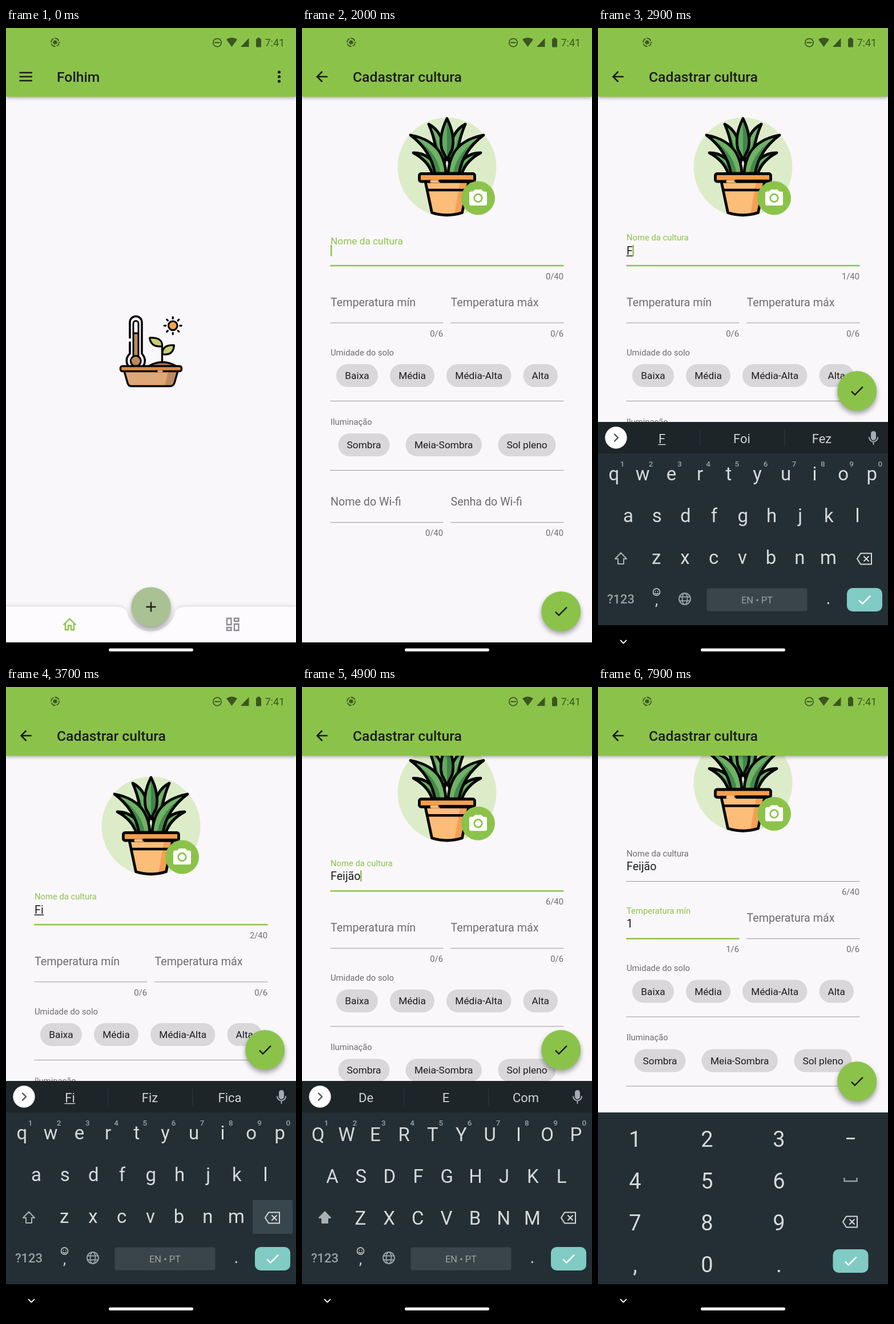
These frames come from a looping animation (508x1102 px, 8000 ms). An HTML page with a canvas:

```html
<!DOCTYPE html>
<html lang="pt">
<head>
<meta charset="utf-8">
<title>Cadastrar cultura</title>
<style>
html, body { margin: 0; width: 100%; height: 100%; overflow: hidden; background: #000; }
canvas { display: block; width: 508px; height: 1102px; }
</style>
</head>
<body>
<canvas id="stage"></canvas>
<script>
const W = 508, H = 1102, LOOP = 8000;
const GREEN = '#8bc34a', PAGE = '#f9f7fa', INK = '#1b1b1d', GREY = '#6e6c70', KEY = '#d5dadc', DIM = '#98a1a5';
const canvas = document.getElementById('stage');
const ctx = canvas.getContext('2d');
const ratio = window.devicePixelRatio || 1;
canvas.width = W * ratio;
canvas.height = H * ratio;

// Timeline in ms
const OPEN = 100, FOCUS_NAME = 1960, KEYS_UP = 2040, SCROLL = 4700, FOCUS_TEMP = 5300, CARET_TEMP = 5420, TYPE_ONE = 6950;
const edits = [
  [FOCUS_NAME, '', null],
  [2900, 'F', ['F', 'Foi', 'Fez']],
  [3150, 'Fi', ['Fi', 'Fiz', 'Fica']],
  [3780, 'F', ['F', 'Foi', 'Fez']],
  [3980, 'Fe', ['Fe', 'Fez', 'Feito']],
  [4150, 'Fei', ['Fei', 'Feito', 'Feira']],
  [4300, 'Feij', ['Feij', 'Feijão', 'Feijões']],
  [4500, 'Feijão', ['De', 'E', 'Com']]
];

const ramp = (t, start, length) => Math.min(1, Math.max(0, (t - start) / length));
const easeOut = (u, power = 3) => 1 - (1 - u) ** power;
const mix = (a, b, u) => a + (b - a) * u;

// y is the middle of the capital letters
function text(s, x, y, size, color = INK, align = 'left', weight = 400) {
  ctx.font = `${weight} ${size}px Roboto, sans-serif`;
  ctx.textAlign = align;
  ctx.fillStyle = color;
  ctx.fillText(s, x, y + size * 0.356);
  return ctx.measureText(s).width;
}
function shape(path, fill, stroke, width = 2) {
  if (typeof path === 'string') path = new Path2D(path);
  if (fill) { ctx.fillStyle = fill; ctx.fill(path); }
  if (stroke) { ctx.strokeStyle = stroke; ctx.lineWidth = width; ctx.stroke(path); }
}
function box(x, y, w, h, r, fill, stroke, width) {
  const p = new Path2D();
  p.roundRect(x, y, w, h, r);
  shape(p, fill, stroke, width);
}
function disc(x, y, r, fill, stroke, width) {
  const p = new Path2D();
  p.arc(x, y, r, 0, 7);
  shape(p, fill, stroke, width);
}
function rays(x, y, inner, outer, color, width) {
  for (let i = 0; i < 8; i++) {
    const c = Math.cos(i * Math.PI / 4), s = Math.sin(i * Math.PI / 4);
    shape(`M${x + c * inner} ${y + s * inner}L${x + c * outer} ${y + s * outer}`, null, color, width);
  }
}
function group(draw, dx = 0, dy = 0) {
  ctx.save();
  ctx.translate(dx, dy);
  draw();
  ctx.restore();
}
function sharp(draw) {
  ctx.save();
  ctx.lineCap = 'butt';
  ctx.lineJoin = 'miter';
  draw();
  ctx.restore();
}
function shadow(blur, dy, alpha, draw) {
  ctx.save();
  ctx.shadowColor = `rgba(0,0,0,${alpha})`;
  ctx.shadowBlur = blur * ratio;
  ctx.shadowOffsetY = dy * ratio;
  draw();
  ctx.restore();
}
function check(x, y, color) {
  sharp(() => shape(`M${x - 9.8} ${y + 0.9}L${x - 3.7} ${y + 6.9}L${x + 10.2} ${y - 7}`, null, color, 2.5));
}

function appBar(title) {
  shadow(6, 2, 0.35, () => box(0, -4, W, 124, 0, GREEN));
  text(title, 89, 85.5, 24.7, INK, 'left', 500);
}
function statusBar() {
  const c = '#3c5522';
  disc(86, 25, 3.6, c);
  ctx.setLineDash([7.5, 3.5]);
  disc(86, 25, 7, null, c, 1.8);
  ctx.setLineDash([]);
  disc(370, 25.5, 7.2, null, c, 1.7);
  shape('M366 25.5H374', null, c, 1.8);
  shape('M386 20Q395.500 13.500 405 20L395.500 33Z', c);
  shape('M411 33L425.500 17.500V33Z', c);
  box(438, 18.5, 9, 15, 1.5, c);
  box(440.5, 16.8, 4, 3, 0, c);
  text('7:41', 453.5, 26, 18, c);
}
function navBar(withChevron) {
  box(0, 1073, W, 29, 0, '#000');
  box(180, 1083.5, 148, 5.2, 2.6, '#f2f2f2');
  if (withChevron) shape('M39.500 1069.500L44.500 1074.500L49.500 1069.500', null, '#eee', 2);
}
function fab(x, y, color) {
  shadow(9, 5, 0.36, () => disc(x, y, 34.6, color));
}

function seedTray() {
  const k = '#050508';
  disc(227.3, 581, 16, '#fdfbfe', k, 3.6);
  shape('M217 572V514a10.500 10.500 0 0 1 21 0V572', '#fdfbfe');
  shape('M217 541V514a10.500 10.500 0 0 1 21 0V569M217 549V569', null, k, 3.6);
  shape('M223 533H232V573H223Z', '#bd8a5c');
  disc(227.3, 581.5, 9, '#bd8a5c', k, 3);
  shape('M223 573V516a4.500 4.500 0 0 1 9 0V573M223 533H232', null, k, 3);
  shape('M249 591Q274 576 299 591Z', '#a8754c', k, 3.4);
  shape('M273.500 584V556', null, k, 3.4);
  shape('M273.500 556Q275 540 251.500 541Q254 558 273.500 556Z', '#c6cf6c', k, 3.2);
  shape('M274 569.500Q273 553 294.500 554Q293 573 274 569.500Z', '#c6cf6c', k, 3.2);
  disc(292.3, 519.8, 7.8, '#f2a648', k, 3.2);
  rays(292.3, 519.8, 12.5, 15, k, 3.2);
  shape('M207 599L213 620Q214.500 625.500 220 625.500H288Q293 625.500 295 620L301 599Z', '#dfa677');
  shape('M284 600H300L294 620Q292 624 288 624H278Z', '#c18a5e');
  shape('M207 599L213 620Q214.500 625.500 220 625.500H288Q293 625.500 295 620L301 599', null, k, 3.4);
  box(200.5, 590.5, 107, 9, 3.5, '#dd8a42', k, 3.4);
  shape('M267 599.500H273', null, '#dfa677', 3.6);
}
function home() {
  box(0, 0, W, H, 0, PAGE);
  appBar('Folhim');
  sharp(() => shape('M23.500 78H46M23.500 85H46M23.500 92H46', null, INK, 2.5));
  for (const y of [77, 85, 93]) disc(478.5, y, 2.6, INK);
  seedTray();
  shadow(6, -1, 0.14, () => shape('M0 1010.500H190Q208 1010.500 212 1020A43 43 0 0 0 296 1020Q300 1010.500 318 1010.500H508V1080H0Z', '#fdfbfe'));
  sharp(() => {
    shape('M100.500 1042.500L111.500 1032L122.500 1042.500M104 1040V1051H109V1043.500H114V1051H119V1040', null, GREEN, 2.4);
    for (const [x, y, h] of [[387, 1031, 11], [387, 1047, 5], [400, 1031, 5], [400, 1041, 11]]) box(x, y, 7.5, h, 0, null, '#8b898d', 2.3);
  });
}

// Left half of the foliage, back to front: outline, shaded part
const leaves = [
  ['M222 168Q247 180 252 224L246 254H238Q238 204 222 168Z', 'M222 168Q244 205 246 254H238Q238 204 222 168Z'],
  ['M195 218Q227 218 241 254H228Q220 231 195 218Z', 'M195 218Q224 229 235 254H228Q220 231 195 218Z'],
  ['M190 187Q227 194 242 218Q251 234 252 254H233Q226 214 190 187Z', 'M190 187Q237 214 243 254H233Q226 214 190 187Z']
];
function plant() {
  const k = '#050505';
  disc(254, 243, 86.5, '#dcecc8');
  const bothSides = ([outline, shade]) => {
    for (const side of [1, -1]) {
      ctx.save();
      ctx.translate(254, 0);
      ctx.scale(side, 1);
      ctx.translate(-254, 0);
      shape(outline, '#6fb266');
      shape(shade, '#43894b');
      shape(outline, null, k, 4.8);
      ctx.restore();
    }
  };
  bothSides(leaves[0]);
  const middle = 'M254 158Q239 188 245 212L254 230L263 212Q269 188 254 158Z';
  shape(middle, '#65a962');
  shape('M254 158Q269 188 263 212L254 230Z', '#3f8549');
  shape(middle, null, k, 4.8);
  bothSides(leaves[1]);
  bothSides(leaves[2]);
  const pot = 'M216 268L227.500 322.500Q254 331 280.500 322.500L292 268Z';
  shape(pot, '#fbbd78');
  shape('M277 268H292L280.500 322.500L267 325Z', '#f3a057');
  shape(pot, null, k, 4.8);
  shape('M220 283H289', null, k, 4.4);
  box(205.5, 254.5, 97, 13.5, 3, '#f59f4e', k, 4.8);
  shape('M227 268H240', null, '#fbbd78', 5);
  shape('M241 267H299', null, k, 4.4);
  disc(308.5, 297, 29.5, GREEN);
  box(293, 285.5, 31, 24.5, 3, '#fff');
  shape('M299 286L303 282H314L318 286Z', '#fff');
  disc(308.5, 297, 6.8, '#fff', GREEN, 2.8);
}

function field(label, x, right, line, f = {}) {
  const float = f.float || 0;
  const color = f.active ? GREEN : GREY;
  text(label, x, mix(line - 36.5, line - 49, float), mix(19.7, 14.8, float), color);
  sharp(() => shape(`M${x - 0.5} ${line}H${right}`, null, f.active ? GREEN : '#99979b', f.active ? 2.6 : 1.1));
  text(f.count || '0/40', right - 0.5, line + 18.5, 14.8, GREY, 'right');
  if (!f.active && !f.value) return;
  const width = text(f.value || '', x, line - 26.5, 19.7);
  if (f.composing) shape(`M${x} ${line - 17}H${x + width}`, null, INK, 1.3);
  if (f.caret) box(x + width - (width ? 0.5 : 0), line - 36, 2.5, 19.5, 0, GREEN);
}
function chips(label, y, items) {
  text(label, 50, y, 14.8, GREY);
  for (const [name, left, right] of items) {
    box(left, y + 20.5, right - left, 40, 20, '#d9d7da');
    text(name, (left + right) / 2, y + 40.5, 17.3, INK, 'center');
  }
  sharp(() => shape(`M49.500 ${y + 85}H458.500`, null, '#99979b', 1.1));
}

function keyboardBar(words) {
  box(0, 688, W, 55, 0, '#1d2528');
  disc(31.5, 715.5, 19.2, '#fff');
  shape(words ? 'M29 709.500L35 715.500L29 721.500' : 'M34 709.500L28 715.500L34 721.500', null, '#4a5053', 2.3);
  if (words) {
    words.forEach((word, i) => {
      const x = 112 + i * 140, w = text(word, x, 717, 22, '#d0d5d7', 'center');
      if (i === 0 && words[0].startsWith('F')) shape(`M${x - w / 2} 727.500H${x + w / 2}`, null, '#d0d5d7', 1.4);
    });
    shape('M179 702V730M327 702V730', null, '#333d42', 1);
  } else {
    shape('M89 706H108V719L103 725H89ZM103 725V719H108', null, DIM, 2.2);
    shape('M94 712V713M103 712V713M93 717Q96 721 100 717', null, DIM, 2);
    text('GIF', 171.5, 715, 19, DIM, 'center', 700);
    disc(245.5, 716, 6, null, DIM, 5);
    rays(245.5, 716, 8, 9.5, DIM, 4);
    box(309, 706, 20, 20, 2, DIM);
    shape('M364 702V730', null, '#333d42', 1.4);
    for (const x of [401, 409, 417]) disc(x, 716, 2.4, DIM);
  }
  box(478, 704, 9, 16, 4.5, '#a4adb1');
  shape('M475 715a7.500 7.500 0 0 0 15 0M482.500 723V727', null, '#a4adb1', 2);
}
function backspace(x, y) {
  shape(`M${x - 13} ${y}l6 -9.500h19v19h-19ZM${x - 1} ${y - 4}l8 8m0 -8l-8 8`, null, KEY, 2);
}
function enter(x, y) {
  box(x - 31, y - 20.5, 62, 41, 10, '#80cbc4');
  check(x, y, '#fff');
}
function letterKeys(caps, deleting) {
  if (deleting) box(432, 896, 70, 59, 2, '#39464d');
  [['QWERTYUIOP', 28, 781], ['ASDFGHJKL', 53, 854], ['ZXCVBNM', 102.3, 927]].forEach(([row, x, y], r) => {
    [...row].forEach((c, i) => {
      const keyX = x + i * 50.2;
      text(caps ? c : c.toLowerCase(), keyX, caps ? y : y - 2.5, 33, KEY, 'center');
      if (r === 0) text((i + 1) % 10, keyX + 14.5, 761.5, 13.5, DIM, 'center', 500);
    });
  });
  shape('M40 916.500L50 927H45V936H35V927H30Z', caps ? '#a9b1b4' : null, '#a9b1b4', 2);
  backspace(467, 927);
  text('?123', 40, 997, 22, DIM, 'center', 500);
  disc(102.5, 985, 6, null, KEY, 1.5);
  shape('M100.500 983.500V984M104.500 983.500V984M99.500 987Q102.500 990 105.500 987', null, KEY, 1.4);
  text(',', 102.5, 998.5, 26, KEY, 'center');
  disc(152, 997, 10, null, DIM, 2);
  const lens = new Path2D();
  lens.ellipse(152, 997, 4.5, 10, 0, 0, 7);
  shape(lens, null, DIM, 1.8);
  shape('M143 993.500H161M143 1000.500H161', null, DIM, 1.8);
  box(190.5, 978.5, 176, 40, 3, '#3a454b');
  text('EN • PT', 278.5, 999, 16.5, DIM, 'center');
  text('.', 403.5, 995, 30, KEY, 'center');
  enter(467, 998.5);
}
function numberKeys() {
  ['123', '456', '789', ',0.'].forEach((row, r) => {
    [...row].forEach((c, i) => text(c, 65 + i * 126, 789 + r * 73, 38, KEY, 'center'));
  });
  sharp(() => {
    shape('M435 788.500H450', null, KEY, 2.8);
    shape('M431.500 857V863H453.500V857', null, DIM, 2.4);
  });
  backspace(442, 934);
  enter(442.5, 1002.5);
}

function form(t, keyTop) {
  const inTemp = t >= FOCUS_TEMP, inName = t >= FOCUS_NAME && !inTemp;
  const [since, name, words] = edits.filter(e => e[0] <= t).pop() || [0, '', null];
  const blink = start => (t - start) % 1000 < 500;
  const scroll = 75.5 * easeOut(ramp(t, SCROLL, 380), 2);
  const one = t >= TYPE_ONE;

  box(0, 0, W, H, 0, PAGE);
  ctx.save();
  ctx.beginPath();
  ctx.rect(0, 110, W, keyTop - 110);
  ctx.clip();
  ctx.translate(0, -scroll);
  plant();
  field('Nome da cultura', 50, 458.5, 415, {
    active: inName, float: easeOut(ramp(t, FOCUS_NAME, 200)), value: name, count: `${name.length}/40`,
    composing: name && t < 4500, caret: inName && blink(since)
  });
  field('Temperatura mín', 50, 247.5, 515, {
    active: inTemp, float: easeOut(ramp(t, FOCUS_TEMP, 200)), value: one ? '1' : '', count: one ? '1/6' : '0/6',
    caret: inTemp && (t < CARET_TEMP || blink(one ? TYPE_ONE : CARET_TEMP))
  });
  field('Temperatura máx', 260.5, 458.5, 515, { count: '0/6' });
  chips('Umidade do solo', 566.5, [['Baixa', 60, 133], ['Média', 154, 232], ['Média-Alta', 253, 366.5], ['Alta', 387.5, 448]]);
  chips('Iluminação', 687.5, [['Sombra', 63.5, 153.5], ['Meia-Sombra', 181.5, 315], ['Sol pleno', 343.5, 444.5]]);
  field('Nome do Wi-fi', 50, 247.5, 863.5);
  field('Senha do Wi-fi', 260.5, 458.5, 863.5);
  ctx.restore();

  appBar('Cadastrar cultura');
  sharp(() => shape('M44.700 85H27M35.500 76L26.500 85L35.500 94', null, INK, 2.5));
  return words;
}

function render(t) {
  ctx.setTransform(ratio, 0, 0, ratio, 0, 0);
  ctx.lineCap = ctx.lineJoin = 'round';
  const enterPage = easeOut(ramp(t, OPEN, 320));
  const drop = 385 * (1 - easeOut(ramp(t, KEYS_UP, 245)));
  const numeric = t >= FOCUS_TEMP;
  const keyTop = numeric ? 743 : 688 + drop;
  let words = null;

  if (enterPage < 1) home();
  if (t >= OPEN) {
    ctx.globalAlpha = enterPage;
    group(() => { words = form(t, keyTop); }, 0, 275 * (1 - enterPage));
    ctx.globalAlpha = 1;
    const x = mix(254, 453.7, enterPage), y = mix(1011, keyTop - 54.3, enterPage);
    fab(x, y, GREEN);
    check(x, y, INK);
  } else {
    fab(254, 1011, '#a9c193');
    sharp(() => shape('M245.500 1011H262.500M254 1002.500V1019.500', null, INK, 2.4));
  }
  if (t >= KEYS_UP) group(() => {
    box(0, numeric ? 743 : 688, W, 500, 0, '#000');
    box(0, 743, W, 300, 0, '#232f35');
    if (numeric) numberKeys();
    else {
      keyboardBar(words);
      letterKeys(t < 2900 || t >= 4500, t >= 3660 && t < 3860);
    }
  }, 0, drop);
  navBar(t >= KEYS_UP);
  statusBar();
}

const begin = performance.now();
function tick(now) {
  render(Math.max(0, now - begin) % LOOP);
  requestAnimationFrame(tick);
}
render(0);
requestAnimationFrame(tick);
</script>
</body>
</html>
```
